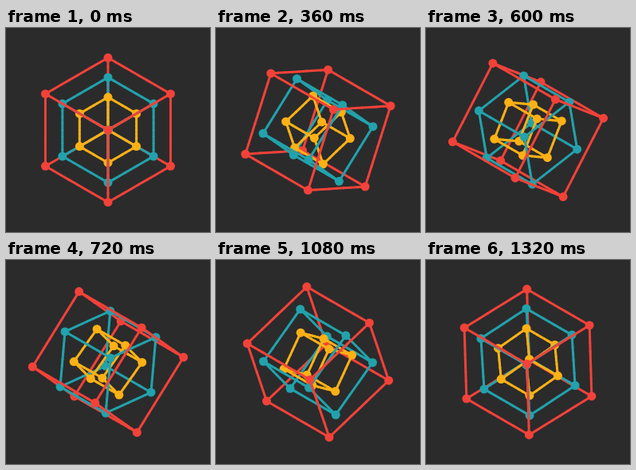
Write an HTML page that moves like this. It is 256x256 px and loops after 1350 ms.

```html
<!DOCTYPE html>
<html lang="en">
<head>
<meta charset="utf-8">
<title>Nested cubes</title>
<style>
  html, body { margin: 0; width: 100%; height: 100%; overflow: hidden; background: #2b2b2c; }
  svg { display: block; width: 100vw; height: 100vh; }
  line { stroke-linecap: round; }
</style>
</head>
<body>
<svg id="stage" viewBox="0 0 256 256"></svg>
<script>
const LOOP = 1350, STEP = 30, PIECES = 8;
const LINE = 3, DOT = 11;
// r: hexagon radius on screen, turns: quarter turns per loop
const cubes = [
  { r: 90.7, turns: 1, color: '#f24239' },
  { r: 66, turns: 2, color: '#22a2ac' },
  { r: 41.2, turns: 3, color: '#fdb115' }
];

const signs = [-1, 1];
const corners = signs.flatMap(x => signs.flatMap(y => signs.map(z => [x, y, z])));
const edges = [];
corners.forEach((a, i) => corners.forEach((b, j) => {
  const differing = a.filter((v, k) => v !== b[k]).length;
  if (i < j && differing === 1) edges.push([i, j]);
}));

const svg = document.getElementById('stage');
const pool = Array.from({ length: cubes.length * (edges.length * PIECES + corners.length) }, () =>
  svg.appendChild(document.createElementNS('http://www.w3.org/2000/svg', 'line')));

// Spin about the cube's x axis, then view along its body diagonal.
function project([x, y, z], angle, r) {
  const c = Math.cos(angle), s = Math.sin(angle);
  const v = y * c - z * s, w = y * s + z * c;
  return [
    128 + r * (x - v) * Math.sqrt(3) / 4,
    128 + r * ((x + v) / 4 - w / 2),
    r * (x + v + w) * Math.SQRT2 / 4
  ];
}

const mix = (a, b, t) => a.map((v, i) => v + (b[i] - v) * t);

function draw(time) {
  const t = Math.floor((time % LOOP) / STEP) * STEP / LOOP;
  const items = [];
  for (const { r, turns, color } of cubes) {
    const pts = corners.map(p => project(p, t * turns * Math.PI / 2, r));
    for (const [i, j] of edges) {
      for (let k = 0; k < PIECES; k++) {
        const a = mix(pts[i], pts[j], k / PIECES);
        const b = mix(pts[i], pts[j], (k + 1) / PIECES);
        items.push({ a, b, color, width: LINE, depth: (a[2] + b[2]) / 2 });
      }
    }
    for (const p of pts) {
      items.push({ a: p, b: p, color, width: DOT, depth: p[2] + DOT / 3 });
    }
  }
  items.sort((p, q) => p.depth - q.depth);
  items.forEach(({ a, b, color, width }, i) => {
    const el = pool[i];
    el.setAttribute('x1', a[0].toFixed(2));
    el.setAttribute('y1', a[1].toFixed(2));
    el.setAttribute('x2', b[0].toFixed(2));
    el.setAttribute('y2', b[1].toFixed(2));
    el.setAttribute('stroke', color);
    el.setAttribute('stroke-width', width);
  });
}

let start = null;
function tick(now) {
  if (start === null) start = now;
  draw(Math.max(0, now - start));
  requestAnimationFrame(tick);
}
draw(0);
requestAnimationFrame(tick);
</script>
</body>
</html>
```
